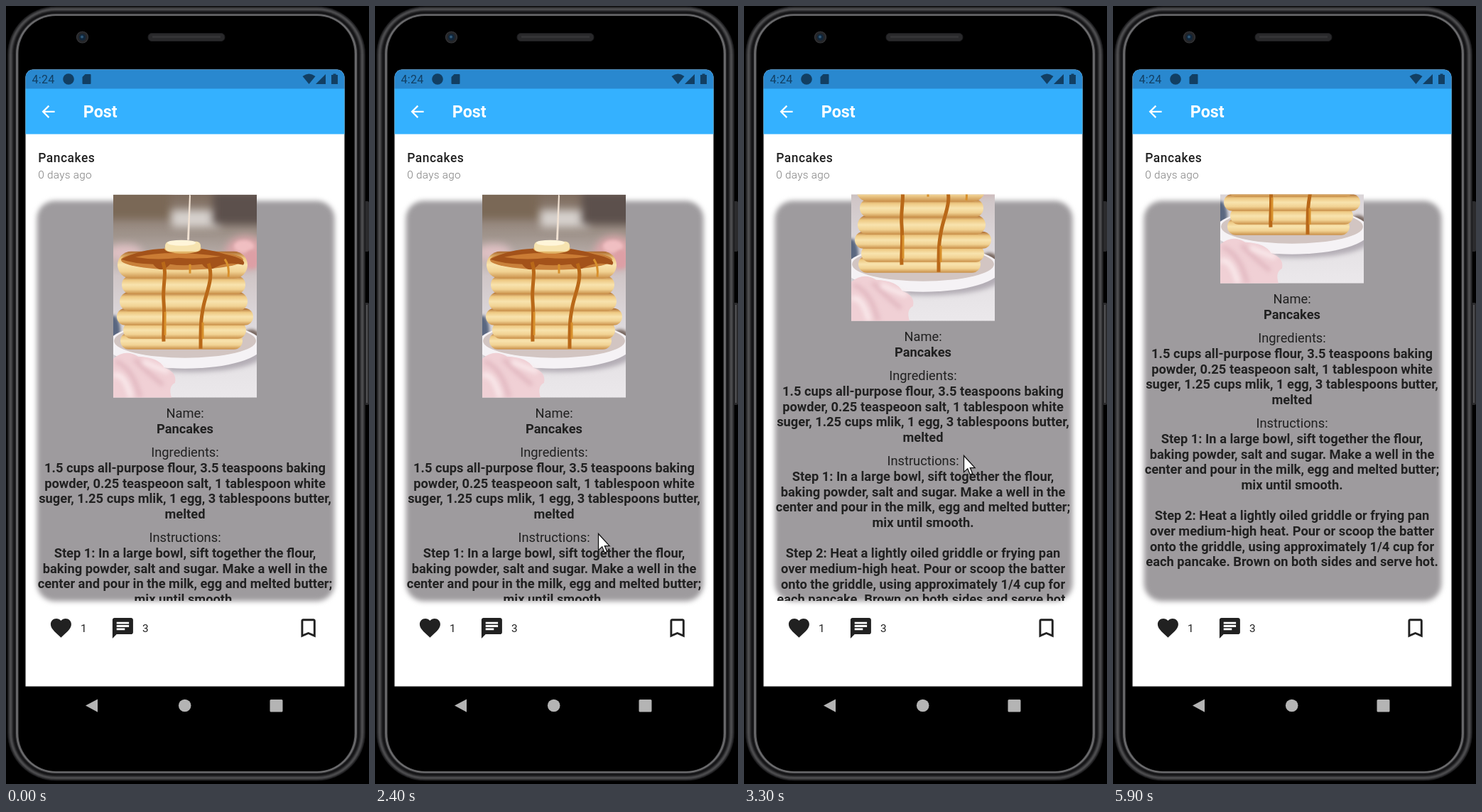
Animation of 511x1096 px, one loop 6100 ms. Source, as an HTML page with a canvas:

```html
<!DOCTYPE html>
<html lang="en">
<head>
<meta charset="utf-8">
<title>Recipe post</title>
<style>
html, body { margin: 0; width: 100%; height: 100%; overflow: hidden; background: #000; }
canvas { display: block; width: 511px; height: 1096px; }
</style>
</head>
<body>
<canvas id="stage" width="511" height="1096"></canvas>
<script>
const ctx = document.getElementById('stage').getContext('2d');
const LOOP = 6100, STEP = 100, MAX_SCROLL = 161;
const INK = '#212121', STATUS = '#123f63';

// Pointer path: time, x, y
const PATH = [
  [1900, 404, 44], [2000, 382, 300], [2100, 352, 560], [2200, 328, 690], [2400, 314, 743],
  [2500, 314, 743], [3000, 309, 671], [3300, 309, 633], [3700, 309, 564], [3900, 309, 548],
  [4400, 325, 500], [4900, 440, -30]
];

// Recipe text: baseline, weight, lines
const RECIPE = [
  [580.3, 400, ['Name:']],
  [602, 700, ['Pancakes']],
  [635.2, 400, ['Ingredients:']],
  [657, 700, ['1.5 cups all-purpose flour, 3.5 teaspoons baking',
    'powder, 0.25 teaspeoon salt, 1 tablespoon white',
    'suger, 1.25 cups mlik, 1 egg, 3 tablespoons butter,', 'melted']],
  [755.2, 400, ['Instructions:']],
  [777, 700, ['Step 1: In a large bowl, sift together the flour,',
    'baking powder, salt and sugar. Make a well in the',
    'center and pour in the milk, egg and melted butter;', 'mix until smooth.', '',
    'Step 2: Heat a lightly oiled griddle or frying pan',
    'over medium-high heat. Pour or scoop the batter',
    'onto the griddle, using approximately 1/4 cup for',
    'each pancake. Brown on both sides and serve hot.']]
];

const ICONS = {
  back: 'M20 11H7.83l5.59-5.59L12 4l-8 8 8 8 1.41-1.41L7.83 13H20v-2z',
  heart: 'M12 21.35l-1.45-1.32C5.4 15.36 2 12.28 2 8.5 2 5.42 4.42 3 7.5 3c1.74 0 3.41.81 4.5 2.09' +
    'C13.09 3.81 14.76 3 16.5 3 19.58 3 22 5.42 22 8.5c0 3.78-3.4 6.86-8.55 11.54z',
  chat: 'M20 2H4c-1.1 0-2 .9-2 2v18l4-4h14c1.1 0 2-.9 2-2V4c0-1.1-.9-2-2-2z' +
    'M6 9h12v2H6V9zm8 5H6v-2h8v2zm4-6H6V6h12v2z',
  bookmark: 'M17 3H7c-1.1 0-2 .9-2 2v16l7-3 7 3V5c0-1.1-.9-2-2-2zm0 15l-5-2.18L7 18V5h10v13z'
};

function rect(x, y, w, h, color) {
  ctx.fillStyle = color;
  ctx.fillRect(x, y, w, h);
}

function round(x, y, w, h, r, fill, stroke, line = 1) {
  ctx.beginPath();
  ctx.roundRect(x, y, w, h, r);
  paint(fill, stroke, line);
}

function oval(x, y, rx, ry, fill, stroke, line) {
  ctx.beginPath();
  ctx.ellipse(x, y, rx, ry, 0, 0, Math.PI * 2);
  paint(fill, stroke, line);
}

function shape(d, fill, stroke, line, x = 0, y = 0, scale = 1) {
  ctx.save();
  ctx.translate(x, y);
  ctx.scale(scale, scale);
  const p = new Path2D(d);
  if (fill) { ctx.fillStyle = fill; ctx.fill(p); }
  if (stroke) { ctx.strokeStyle = stroke; ctx.lineWidth = line; ctx.stroke(p); }
  ctx.restore();
}

function icon(name, x, y, scale, color) {
  shape(ICONS[name], color, null, 0, x, y, scale);
}

function paint(fill, stroke, line) {
  if (fill) { ctx.fillStyle = fill; ctx.fill(); }
  if (stroke) { ctx.strokeStyle = stroke; ctx.lineWidth = line; ctx.stroke(); }
}

function text(str, x, y, size, weight, color, align = 'left', spacing = 0) {
  ctx.font = `${weight} ${size}px Roboto, sans-serif`;
  ctx.letterSpacing = spacing + 'px';
  ctx.textAlign = align;
  ctx.fillStyle = color;
  ctx.fillText(str, x, y);
}

function gradient(x0, y0, x1, y1, ...stops) {
  const g = ctx.createLinearGradient(x0, y0, x1, y1);
  stops.forEach((c, i) => g.addColorStop(i / (stops.length - 1), c));
  return g;
}

function blurred(px, draw) {
  ctx.save();
  ctx.filter = `blur(${px}px)`;
  draw();
  ctx.restore();
}

function drawPhone() {
  rect(0, 0, 511, 1096, '#000');
  round(504, 275, 7, 71, 2, '#2b2b2d');
  round(504, 418, 7, 144, 2, '#2b2b2d');
  rect(507, 421, 2, 138, '#505052');

  // Metal rim: a soft outer sheen and a brighter inner edge
  for (let i = 0; i < 15; i++) {
    const sheen = 62 * Math.exp(-(((i - 4) / 3) ** 2)) + 105 * Math.exp(-(((i - 13) / 1.6) ** 2));
    const v = Math.round(16 + sheen);
    round(2 + i, 0.5 + i * 0.9, 504 - i * 2, 1091 - i * 1.8, 68 - i, `rgb(${v},${v},${v + 2})`);
  }
  round(17.5, 14, 473, 1064, 53, '#000');

  round(200, 38.5, 108, 11, 5, '#29292b', '#1b1b1d');
  rect(206, 42, 96, 3, '#343436');
  oval(107.5, 44, 8, 8, '#252629', '#36373a', 1.2);
  oval(107.5, 44, 4.6, 4.6, '#11263a');
  oval(107, 43.5, 2, 2, '#2f5878');
}

function drawBars() {
  round(27.5, 89.5, 449, 869, [11, 11, 0, 0], '#fff');
  round(27.5, 89.5, 449, 28, [11, 11, 0, 0], '#2988cf');
  rect(27.5, 116.5, 449, 64, '#34b1ff');
  text('4:24', 36.5, 109, 16, 400, STATUS, 'left', 0.3);
  oval(88, 103, 7.8, 7.8, STATUS);
  shape('M111.5 96H118.5Q119.5 96 119.5 97V109Q119.5 110 118.5 110H108.5Q107.5 110 107.5 109V100Z', STATUS);
  shape('M417.5 99Q426.5 92 435.5 99L426.5 110Z', STATUS);
  shape('M450 96V110H436Z', STATUS);
  shape('M460.5 95.5H464.5V97H467V110H458V97H460.5Z', STATUS);
  icon('back', 46, 135.3, 1.13, '#fff');
  text('Post', 108.8, 157.3, 23.3, 700, '#fff');
  text('Pancakes', 45.2, 219.6, 17.46, 500, INK, 'left', 0.5);
  text('0 days ago', 45.3, 243, 15.3, 300, '#7c7c7c', 'left', 0.27);
}

function drawActions() {
  icon('heart', 60, 858.7, 1.45, INK);
  text('1', 105, 881.8, 15.3, 400, INK);
  icon('chat', 147, 859, 1.45, INK);
  text('3', 192, 881.8, 15.3, 400, INK);
  icon('bookmark', 408.2, 859, 1.45, INK);
  const nav = '#b4b4b4';
  shape('M112 985.5L129 976.5V994.8Z', nav);
  oval(251.7, 985.5, 8.8, 8.8, nav);
  round(371.5, 977, 18, 17.5, 1.5, nav);
}

function pancake(left, top, w, h) {
  const fill = gradient(0, top, 0, top + h, '#a8642a', '#eec983', '#f8e3ae', '#f1d293', '#c98f48');
  round(left, top, w, h, h / 2, fill);
}

function drawPhoto(x, y) {
  ctx.save();
  ctx.translate(x, y);
  ctx.beginPath();
  ctx.rect(0, 0, 202, 286);
  ctx.clip();
  rect(0, 0, 202, 286, gradient(0, 0, 0, 286, '#7f6d5f', '#a0948c', '#d0c6c7', '#dcd7da', '#e4e1e4', '#ebe8eb'));
  blurred(6, () => {
    rect(-10, -10, 90, 44, '#7a6856');
    rect(82, 22, 68, 24, '#d6d1cd');
    rect(140, -4, 80, 46, '#5c504c');
    oval(186, 82, 28, 24, '#dca6aa');
    oval(16, 82, 25, 12, '#dfc0c3');
  });
  blurred(2, () => {
    oval(184, 73, 14, 9, '#f0bfc2');
    oval(195, 91, 10, 13, '#dd9fa5');
    oval(0, 192, 10, 22, '#5a6780');
    oval(194, 202, 13, 12, '#77675f');
  });

  // Plate
  blurred(3, () => oval(106, 226, 104, 24, '#b3adb5'));
  oval(101, 212, 110, 33, '#f5f2f5');
  oval(101, 206, 100, 24, '#d2c5c2');

  // Pancakes, bottom to top
  pancake(10, 194, 172, 24);
  pancake(14, 179, 173, 24);
  pancake(5, 160, 192, 24);
  pancake(9, 137, 180, 27);
  pancake(12, 114, 174, 26);
  pancake(6, 80, 183, 38);
  oval(97, 92, 86, 14, '#c9803a');

  // Syrup, butter and the pour
  shape('M11 91Q38 77 72 76Q114 70 158 84Q190 91 183 99Q161 94 145 102Q133 109 125 98Q97 101 80 98' +
    'Q67 113 56 98Q27 97 11 91Z', '#a3521a');
  shape('M31 88Q79 77 151 87Q120 92 92 89Q60 93 31 88Z', '#cb7c34');
  shape('M70 95C76 112 69 126 71 151S70 187 71 207M134 97C142 117 131 137 127 157S123 184 123 217', null, '#b96818', 5);
  shape('M108 98V111M157 91Q164 101 162 116M73 165V198M126 180V203', null, '#d8902c', 3);
  oval(98, 76, 26, 7, '#e2b568');
  round(73, 66, 50, 14, 6, '#f6e3b0');
  oval(96, 68, 20, 4, '#fff5d9');
  shape('M107 0L109 1L107 64H104Z', '#f1e2d3');

  // Napkin
  shape('M0 231Q17 217 35 228Q64 229 72 244Q90 250 87 265Q77 270 82 286H0Z', '#f0d0d5');
  blurred(3, () => {
    shape('M3 235Q28 244 38 286M30 232Q45 248 70 268', null, '#dfb4bd', 5);
    shape('M0 255Q15 249 25 286M42 235Q65 246 78 249', null, '#f9e9eb', 7);
  });
  ctx.restore();
}

function drawCard(scroll) {
  blurred(3.6, () => round(43.5, 274.5, 419, 564, 25, '#9e9b9e'));
  ctx.save();
  ctx.beginPath();
  ctx.rect(28, 265.5, 449, 572.5);
  ctx.clip();
  ctx.translate(0, -scroll);
  drawPhoto(151, 265.7);
  for (const [y, weight, lines] of RECIPE) {
    lines.forEach((s, i) => text(s, 252, y + i * 21.67, 18.3, weight, INK, 'center'));
  }
  ctx.restore();
}

function pointer(t) {
  const i = PATH.findIndex(p => p[0] > t);
  if (i < 1) return null;
  const [t0, x0, y0] = PATH[i - 1], [t1, x1, y1] = PATH[i];
  const k = (t - t0) / (t1 - t0);
  return { x: x0 + (x1 - x0) * k, y: y0 + (y1 - y0) * k };
}

function scrollAt(t, tip) {
  if (t < 2500) return 0;
  return tip ? Math.max(0, Math.min(MAX_SCROLL, 741 - tip.y)) : MAX_SCROLL;
}

function frame(now) {
  const t = Math.floor(now % LOOP / STEP) * STEP;
  const tip = pointer(t);
  drawPhone();
  drawBars();
  drawCard(scrollAt(t, tip));
  drawActions();
  if (tip) shape('M0 0V16.3L3.7 12.9L6.2 18.8L8.6 17.8L6.2 12H11Z', '#fff', '#111', 0.9, tip.x + 0.5, tip.y + 0.5, 1.42);
  requestAnimationFrame(frame);
}

requestAnimationFrame(frame);
</script>
</body>
</html>
```
